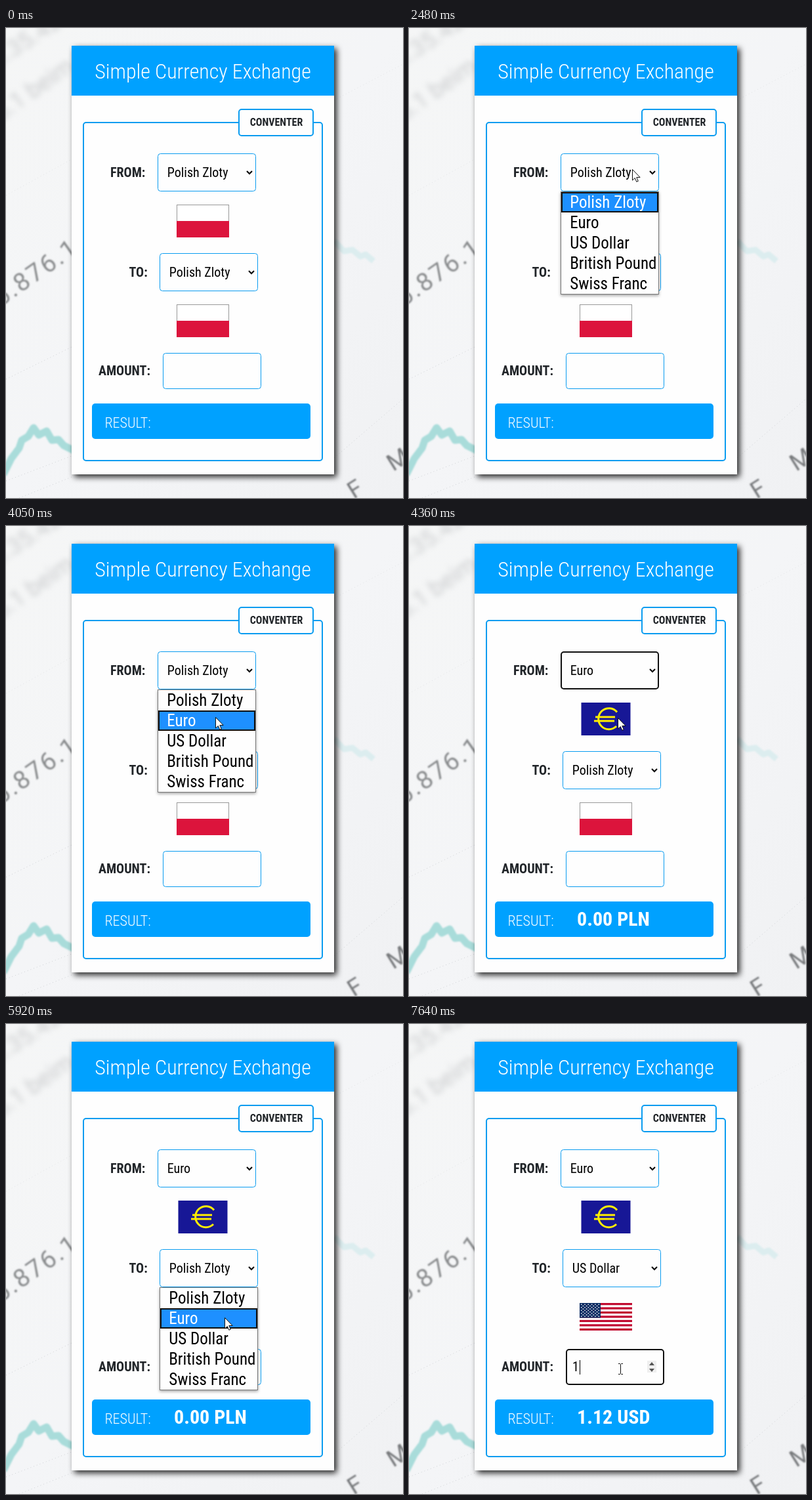
These frames come from a looping animation (605 by 716 pixels, 8000 ms). An HTML page:

```html
<!DOCTYPE html>
<html lang="en">
<head>
<meta charset="utf-8">
<title>Simple Currency Exchange</title>
<style>
  html, body { margin: 0; width: 100%; height: 100%; overflow: hidden; background: #f3f4f6; }
  svg { display: block; width: 605px; height: 716px; }
  .ui text, #probe { font-family: "Roboto Condensed", Roboto, sans-serif; font-stretch: condensed; white-space: pre; }
  .paper text { font-family: Roboto, sans-serif; }
  .card { filter: drop-shadow(4px 4px 5px rgba(0, 0, 0, .85)); }
  .list { filter: drop-shadow(0 2px 2px rgba(0, 0, 0, .35)); }
  #probe { position: absolute; visibility: hidden; font-size: 100px; }
</style>
</head>
<body>
<svg viewBox="0 0 605 716">
  <defs>
    <linearGradient id="sheet" x1="0" y1="0" x2="1" y2="1">
      <stop offset="0" stop-color="#f5f6f6"/>
      <stop offset=".5" stop-color="#f4f5f7"/>
      <stop offset="1" stop-color="#f0f1f3"/>
    </linearGradient>
    <filter id="soft" x="-20%" y="-50%" width="140%" height="200%"><feGaussianBlur stdDeviation="1.3"/></filter>
    <filter id="far" x="-20%" y="-50%" width="140%" height="200%"><feGaussianBlur stdDeviation="4"/></filter>
  </defs>
  <g class="paper">
    <rect width="605" height="716" fill="url(#sheet)"/>
    <g filter="url(#far)" fill="#a9abae" opacity=".55" font-size="36">
      <text transform="translate(-14 62) rotate(-33)">0.35.42</text>
      <text transform="translate(-8 143) rotate(-35)">6.1 beim</text>
    </g>
    <g filter="url(#soft)" fill="#77797c" font-size="38">
      <text transform="translate(-8 425) rotate(-35)" letter-spacing="3" opacity=".85">5.876.1</text>
      <text transform="translate(530 718) rotate(-32)" font-size="36">F</text>
      <text transform="translate(590 676) rotate(-32)" font-size="36">M</text>
    </g>
    <g fill="none" stroke="#cfd1d4" stroke-dasharray="1 4">
      <path d="M0 690L100 652M0 535L100 486M500 655L605 565M20 716L100 684"/>
      <path d="M0 255L100 200M500 110L605 55" opacity=".5"/>
    </g>
    <g filter="url(#soft)" fill="none" stroke-linejoin="round">
      <path d="M-4 680L8 656L20 640L24 628L34 622L42 609L50 620L62 614L70 628L80 627L88 636L104 644" stroke="#a9dcda" stroke-width="11"/>
      <path d="M500 324L515 340L528 338L540 348L548 345L560 355" stroke="#dcedef" stroke-width="9"/>
    </g>
  </g>
  <g class="ui">
    <g class="card"><rect x="100" y="27" width="400" height="653" fill="#fefefe"/></g>
    <rect x="100" y="27" width="400" height="76" fill="#00a1ff"/>
    <g id="form"></g>
    <g id="scene"></g>
  </g>
</svg>
<span id="probe">Polish Zloty</span>
<script>
const LOOP = 8000, STEP = 156.4, BLUE = '#0a9cf0', INK = '#212529';
const CURRENCIES = ['Polish Zloty', 'Euro', 'US Dollar', 'British Pound', 'Swiss Franc'];
const $ = id => document.getElementById(id);

// Narrow the glyphs only where no condensed face is installed.
function condenseFactor() {
  const probe = $('probe'), narrow = probe.offsetWidth;
  probe.style.fontFamily = 'Roboto, sans-serif';
  probe.style.fontStretch = 'normal';
  const ratio = narrow / probe.offsetWidth;
  probe.remove();
  return ratio < .95 ? 1 : .885;
}
const squeeze = condenseFactor();

const text = (x, y, size, weight, str, fill = INK, anchor = 'start') =>
  `<text transform="translate(${x} ${y}) scale(${squeeze} 1)" font-size="${size}" font-weight="${weight}" fill="${fill}" text-anchor="${anchor}">${str}</text>`;

const rect = (x, y, w, h, fill) => `<rect x="${x}" y="${y}" width="${w}" height="${h}" fill="${fill}"/>`;

const box = (x, y, w, h, stroke, line, radius = 4) =>
  `<rect x="${x + line / 2}" y="${y + line / 2}" width="${w - line}" height="${h - line}" rx="${radius}" fill="#fefefe" stroke="${stroke}" stroke-width="${line}"/>`;

const field = (x, y, h, focused) => box(x, y, 150, h, focused ? '#101010' : BLUE, focused ? 2 : 1);

const select = (x, y, value, focused) =>
  field(x, y, 58, focused) + text(x + 14.7, y + 36, 20, 400, value, '#000') +
  `<path d="M${x + 136} ${y + 27}l4 4 4-4" fill="none" stroke="#000" stroke-width="2"/>`;

function dropdown(x, y, cursorY) {
  const active = Math.max(0, Math.floor((cursorY - y - 1) / 31));
  const rows = CURRENCIES.map((name, i) => {
    const top = y + 1 + i * 31, on = i === active;
    const mark = on ? `<rect x="${x + 2}" y="${top + 1}" width="146" height="29" fill="#1e90ff" stroke="#101010" stroke-width="2"/>` : '';
    return mark + text(x + 14.2, top + 24, 25, 400, name, on ? '#fff' : '#000');
  });
  return `<g class="list">${box(x, y, 150, 157, '#767676', 1, 0)}</g>` + rows.join('');
}

const flags = {
  poland: y => `<rect x="260.5" y="${y + .5}" width="79" height="49" fill="#fff" stroke="#999"/>` +
    rect(260, y + 25, 80, 25, '#dc143c'),
  euro: y => rect(262.5, y, 75, 50, '#171796') +
    `<g transform="translate(304 ${y + 25})" fill="none" stroke="#ffed00" stroke-width="3">
      <path d="M13-10.500A16 16 0 1 0 12 11M-20-3H10M-22 3H9"/></g>`,
  usa(y) {
    const h = 42 / 13;
    let out = rect(260, y + 4, 80, 42, '#fff');
    for (let i = 0; i < 13; i += 2) out += rect(260, y + 4 + i * h, 80, h, '#c10b30');
    out += rect(260, y + 4, 32, h * 7, '#0c2c63');
    for (let r = 0; r < 9; r++)
      for (let c = 0; c < 6 - r % 2; c++)
        out += `<circle cx="${262.700 + c * 5.300 + r % 2 * 2.650}" cy="${y + 6.260 + r * 2.260}" r=".85" fill="#fff"/>`;
    return out;
  },
  none: () => ''
};

// Pointer stops: step, x, y.
const path = [
  [0, 432, 657], [2, 355, 430], [4, 246, 262], [5, 251, 251], [6, 260, 230], [11, 340, 215],
  [14, 340, 215], [16, 335, 230], [17, 335, 230], [21, 323, 279], [22, 320, 289], [24, 318, 292],
  [25, 318, 292], [30, 346, 372], [31, 346, 372], [35, 333, 447], [37, 328, 480], [38, 327, 482],
  [40, 322, 524], [45, 322, 524], [46, 322, 525]
];

function pointerAt(n) {
  const i = path.findIndex(p => p[0] >= n);
  if (i < 0) return path[path.length - 1].slice(1);
  if (i === 0) return path[0].slice(1);
  const a = path[i - 1], b = path[i], u = (n - a[0]) / (b[0] - a[0]);
  return [1, 2].map(k => Math.round(a[k] + (b[k] - a[k]) * u));
}

const arrow = (x, y) =>
  `<path transform="translate(${x + .5} ${y + .5})" d="M0 0V16.500L3.800 13L6.300 18.800L8.800 17.700L6.300 12H11.600Z" fill="#fff" stroke="#111"/>`;
const beam = (x, y) =>
  `<path transform="translate(${x + .5} ${y + .5})" d="M-3.500-8H-1L0-7L1-8H3.500M0-7V7M-3.500 8H-1L0 7L1 8H3.500" fill="none" stroke="#111"/>`;
const spinner = () => rect(363, 513, 14, 18, '#efefef') +
  '<path d="M366 520L370 515L374 520ZM366 525H374L370 530Z" fill="#555"/>';

function draw(n) {
  const [x, y] = pointerAt(n);
  const picked = n >= 24, target = n >= 38, typing = n >= 42, typed = n >= 46;
  const source = n < 24 ? 'poland' : n < 25 ? 'none' : 'euro';
  const result = typed ? '1.12 USD' : target ? '0.00 USD' : picked ? '0.00 PLN' : '';
  let out = select(231, 191, CURRENCIES[picked ? 1 : 0], picked && n < 31) + flags[source](269) +
    select(234, 343, CURRENCIES[target ? 2 : 0], target && !typing) +
    flags[n < 38 ? 'poland' : n < 39 ? 'none' : 'usa'](421) +
    field(239, 495, 55, typing) + text(256, 609, 30, 700, result, '#fff');
  if (n >= 39) out += spinner();
  if (typed) out += text(249, 529, 20, 400, '1', '#000');
  if (typing) out += rect(typed ? 260 : 250, 512, 1, 22, '#000');
  if (n >= 13 && n < 24) out += dropdown(231, 249, y);
  if (n >= 31 && n < 38) out += dropdown(234, 401, y);
  if (n >= 0) out += (n >= 39 ? beam : arrow)(x, y);
  $('scene').innerHTML = out;
}

$('form').innerHTML =
  text(300, 77, 32, 300, 'Simple Currency Exchange', '#fff', 'middle') +
  box(117, 143, 366, 517, BLUE, 2) + box(354, 123, 115, 42, BLUE, 2) +
  text(412, 149, 16, 700, 'CONVENTER', INK, 'middle') +
  text(159, 227, 20, 700, 'FROM:') + text(187.500, 379, 20, 700, 'TO:') + text(141, 529, 20, 700, 'AMOUNT:') +
  '<rect x="131" y="572" width="333" height="54" rx="5" fill="#00a1ff"/>' +
  text(150.500, 609, 22, 300, 'RESULT:', '#fff');

let shown = null;
function tick() {
  const n = Math.max(-1, Math.floor((performance.now() % LOOP - 435) / STEP));
  if (n !== shown) draw(shown = n);
  requestAnimationFrame(tick);
}
tick();
</script>
</body>
</html>
```
